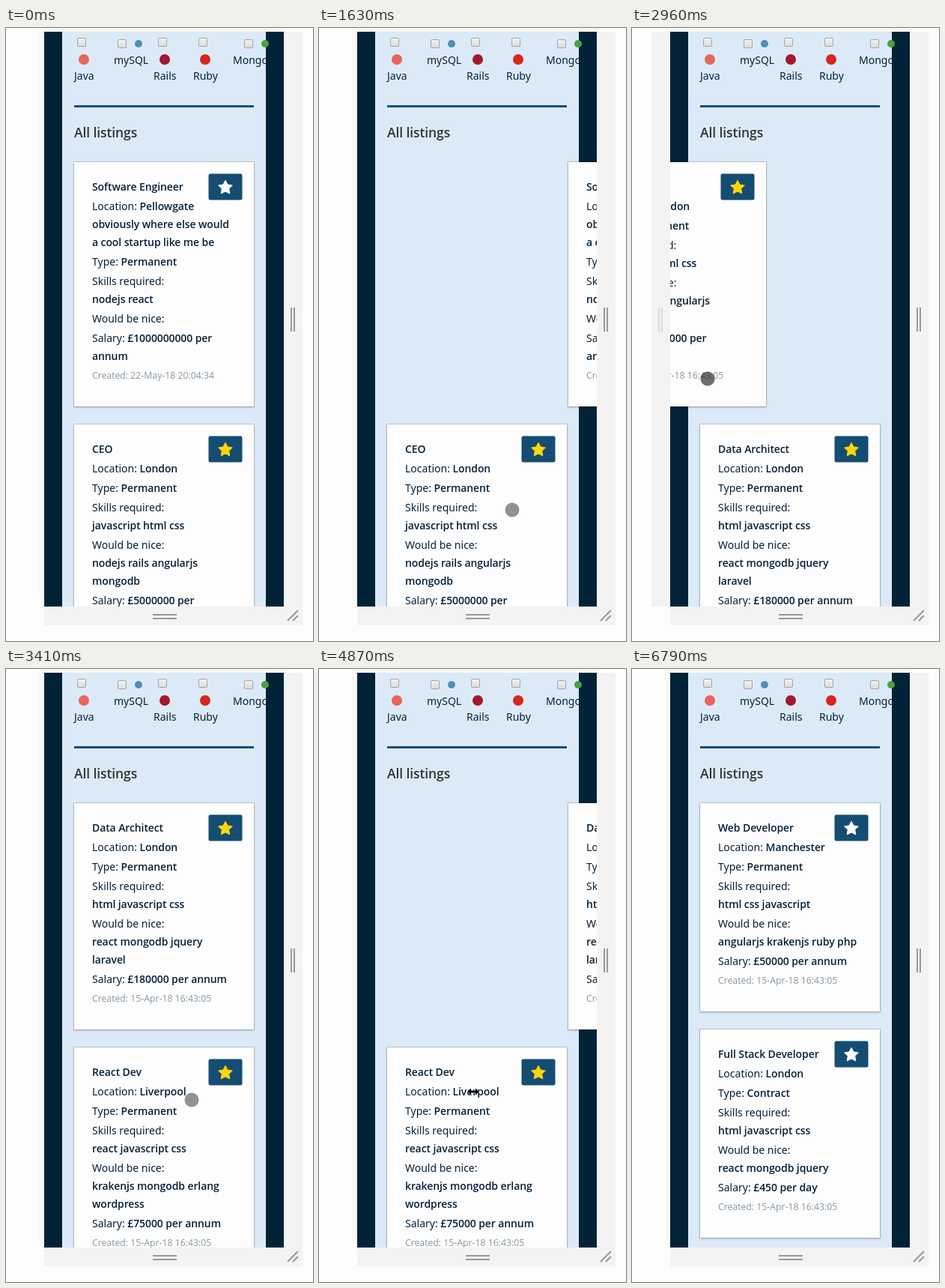
An HTML page that plays this animation: 410x818 px, repeating every 7.8 s.

```html
<!DOCTYPE html>
<html lang="en">
<head>
<meta charset="utf-8">
<title>Job listings</title>
<style>
  html, body { margin: 0; width: 100%; height: 100%; overflow: hidden; background: #fdfdfd; }
  #stage { position: relative; width: 410px; height: 818px; overflow: hidden;
    font: 14px/24px "Noto Sans", "Open Sans", sans-serif; color: #05213a; white-space: nowrap; }
  #stage div, #stage > svg, .check, .logo, .star { position: absolute; }
  .screen { inset: 0; clip-path: inset(5px 39px 46px 51px); background: #022238; }
  .panel { left: 75px; top: 5px; width: 272px; height: 767px; background: #dceaf8; }
  .rule { left: 91px; top: 103px; width: 240px; height: 3px; background: #154e77; }
  .heading, b { font-family: "Open Sans", "Noto Sans", sans-serif; font-weight: 600; letter-spacing: -.1px; }
  .heading { left: 91px; top: 127px; font-size: 17.5px; color: #333; }
  .tech { top: 52px; }
  .check { left: calc(50% - 9px); top: -39px; box-sizing: border-box; width: 12px; height: 12px;
    border: 1px solid #a5a5a5; border-radius: 2px; background: linear-gradient(#f2f2f2, #dcdcdc); }
  .logo { left: calc(50% - 7px); top: -17px; width: 14px; height: 14px; border-radius: 50%; }
  .tech.wide { top: 31px; }
  .wide .check { left: calc(50% - 18px); top: -16px; }
  .wide .logo { left: calc(50% + 5px); top: -15px; width: 10px; height: 10px; }
  .card { left: 91px; box-sizing: border-box; width: 240px; padding: 21px 24px 27px; background: #fdfdfd;
    box-shadow: 0 0 0 1px #0002, 0 1px 3px #0004; }
  .card p { margin: 0 0 2px; }
  .card .created { font-family: "Open Sans", "Noto Sans", sans-serif; font-size: 12.25px; color: #8797a3; }
  .star { left: 180px; top: 16px; width: 44px; height: 34px; border-radius: 2px; background: #154c72;
    box-shadow: 0 0 0 .5px #154c72; }
  .strip { background: #f3f3f3; }
</style>
</head>
<body>
<div id="stage">
  <div class="strip" style="left:44px;top:0;width:330px;height:772px;border-radius:0 0 0 16px;background:#f8f8f8"></div>
  <div class="strip" id="leftStrip" style="left:26px;top:5px;width:25px;height:767px"></div>
  <div class="strip" style="left:372px;top:5px;width:24px;height:767px"></div>
  <div class="strip" style="left:51px;top:772px;width:345px;height:25px"></div>
  <div class="screen" id="screen">
    <div class="panel"></div>
    <div class="rule"></div>
    <div class="heading">All listings</div>
  </div>
  <svg width="410" height="818" fill="none" stroke="#999" stroke-width="2">
    <path d="M381 373v32M385 373v32M196 783h32M196 788h32M376 791l14-14M383 791l7-7"/>
    <path id="leftGrip" stroke="#d2d2d2" stroke-width="1.5" d="M36 373v32M40 373v32"/>
    <g id="cursor" stroke="none">
      <circle id="dot" r="9.5"/>
      <path id="arrow" d="M-8 0l5-4.5v3h6v-3l5 4.5-5 4.5v-3h-6v3z" fill="#000" stroke="#fff" stroke-width="1" paint-order="stroke"/>
    </g>
  </svg>
</div>
<script>
const LOOP = 7800, START = 300, TICK = 147.4, EXIT = 242;
const $ = id => document.getElementById(id);
const add = html => {
  $('screen').insertAdjacentHTML('beforeend', html);
  return $('screen').lastElementChild;
};

[
  ['Java', '#e8665c', ''],
  ['mySQL', '#4f8fb5', 'wide'],
  ['Rails', '#a3182c', ''],
  ['Ruby', '#d8261c', ''],
  ['MongoDB', '#47a141', 'wide'],
].forEach(([name, colour, size], i) => add(`<div class="tech ${size}" style="left:${91 + 53 * i}px">
  ${name}<span class="check"></span><span class="logo" style="background:${colour}"></span>
</div>`));

const starPoints = Array.from({ length: 10 }, (_, i) => {
  const r = i % 2 ? 5 : 9.8, a = i * Math.PI / 5;
  return `${(22 + r * Math.sin(a)).toFixed(2)},${(18 - r * Math.cos(a)).toFixed(2)}`;
}).join(' ');

// Times are in ticks. A swiped card follows the pointer by dx, slides out and is gone;
// the pointer then moves on to rest: [tick, x, y].
const TAP = [37, 293, 213];
const april = '15-Apr-18 16:43:05';
const cards = [
  { title: 'Software Engineer', place: 'Pellowgate|obviously where else would|a cool startup like me be', type: 'Permanent',
    skills: 'nodejs react', nice: '', salary: '£1000000000 per|annum', created: '22-May-18 20:04:34',
    swipe: { press: 3, release: 6, gone: 10, x: 240, y: 445, dx: 125, rest: [9, 258, 643] } },
  { title: 'CEO', place: 'London', type: 'Permanent', skills: 'javascript html css',
    nice: 'nodejs rails angularjs|mongodb', salary: '£5000000 per|annum', created: april, starred: true,
    swipe: { press: 14, release: 20, gone: 21, x: 253, y: 468, dx: -228, rest: [21, 248, 575] } },
  { title: 'Data Architect', place: 'London', type: 'Permanent', skills: 'html javascript css',
    nice: 'react mongodb jquery|laravel', salary: '£180000 per annum', created: april, starred: true,
    swipe: { press: 25, release: 29, gone: 32, x: 221, y: 434, dx: 179, rest: [31, 206, 564] } },
  { title: 'React Dev', place: 'Liverpool', type: 'Permanent', skills: 'react javascript css',
    nice: 'krakenjs mongodb erlang|wordpress', salary: '£75000 per annum', created: april, starred: true, tapped: true,
    swipe: { press: 39, release: 41, gone: 44, x: 289, y: 429, dx: 64, rest: [43, 320, 806] } },
  { title: 'Web Developer', place: 'Manchester', type: 'Permanent', skills: 'html css javascript',
    nice: 'angularjs krakenjs ruby php', salary: '£50000 per annum', created: april },
  { title: 'Full Stack Developer', place: 'London', type: 'Contract', skills: 'html javascript css',
    nice: 'react mongodb jquery', salary: '£450 per day', created: april },
];
const swipes = cards.flatMap(card => card.swipe ?? []);

const bold = text => `<b>${text.replaceAll('|', '<br>')}</b>`;
for (const c of cards) {
  c.el = add(`<div class="card">
    <p>${bold(c.title)}</p>
    <p>Location: ${bold(c.place)}</p>
    <p>Type: ${bold(c.type)}</p>
    <p>Skills required:${bold('|' + c.skills)}</p>
    <p>Would be nice:${c.nice && bold('|' + c.nice)}</p>
    <p>Salary: ${bold(c.salary)}</p>
    <p class="created">Created: ${c.created}</p>
    <svg class="star"><polygon points="${starPoints}" stroke-width="1" stroke-linejoin="round"/></svg>
  </div>`);
  c.star = c.el.querySelector('polygon');
  c.height = c.el.offsetHeight;
}

const pointer = [
  [0, 400, 400],
  TAP,
  ...swipes.flatMap(s => [[s.press, s.x, s.y], [s.release, s.x + s.dx, s.y], s.rest]),
].sort((a, b) => a[0] - b[0]);

const clamp = v => Math.min(1, Math.max(0, v));
const progress = (tick, from, to) => clamp((tick - from) / (to - from));

function pointerAt(tick) {
  const i = Math.max(1, pointer.findIndex(key => key[0] >= tick));
  const [from, x0, y0] = pointer[i - 1], [to, x1, y1] = pointer[i];
  const p = progress(tick, from, to);
  return [x0 + (x1 - x0) * p, y0 + (y1 - y0) * p];
}

function swipeOffset({ press, release, gone, dx }, tick) {
  const slide = Math.sign(dx) * EXIT - dx;
  const slid = tick > release ? progress(tick, release, gone - 1) : 0;
  return dx * progress(tick, press, release) + slide * slid;
}

const show = (el, visible) => { el.style.display = visible ? '' : 'none'; };

function render(time) {
  const tick = Math.floor((time - START) / TICK);

  let top = 179;
  for (const { el, star, height, swipe, starred, tapped } of cards) {
    const present = !swipe || tick < swipe.gone;
    show(el, present);
    if (!present) continue;
    el.style.top = top + 'px';
    el.style.left = 91 + (swipe ? swipeOffset(swipe, tick) : 0) + 'px';
    const colour = starred && !(tapped && tick >= TAP[0]) ? '#ffd60a' : '#fff';
    star.setAttribute('fill', colour);
    star.setAttribute('stroke', colour);
    top += height + 24;
  }

  const active = tick >= 0 && tick <= pointer.at(-1)[0];
  const [x, y] = active ? pointerAt(tick) : pointer[0].slice(1);
  const pressed = swipes.some(s => tick >= s.press && tick <= s.release);
  const resizing = tick >= swipes[2].release || x > 371;
  show($('cursor'), active);
  $('cursor').setAttribute('transform', `translate(${x} ${y})`);
  $('dot').setAttribute('fill', pressed ? 'rgba(40,40,40,.68)' : '#919191');
  show($('dot'), !resizing);
  show($('arrow'), resizing);

  const nearLeftEdge = x < 190;
  show($('leftStrip'), nearLeftEdge);
  show($('leftGrip'), nearLeftEdge);
}

function loop() {
  render(performance.now() % LOOP);
  requestAnimationFrame(loop);
}
loop();
</script>
</body>
</html>
```
